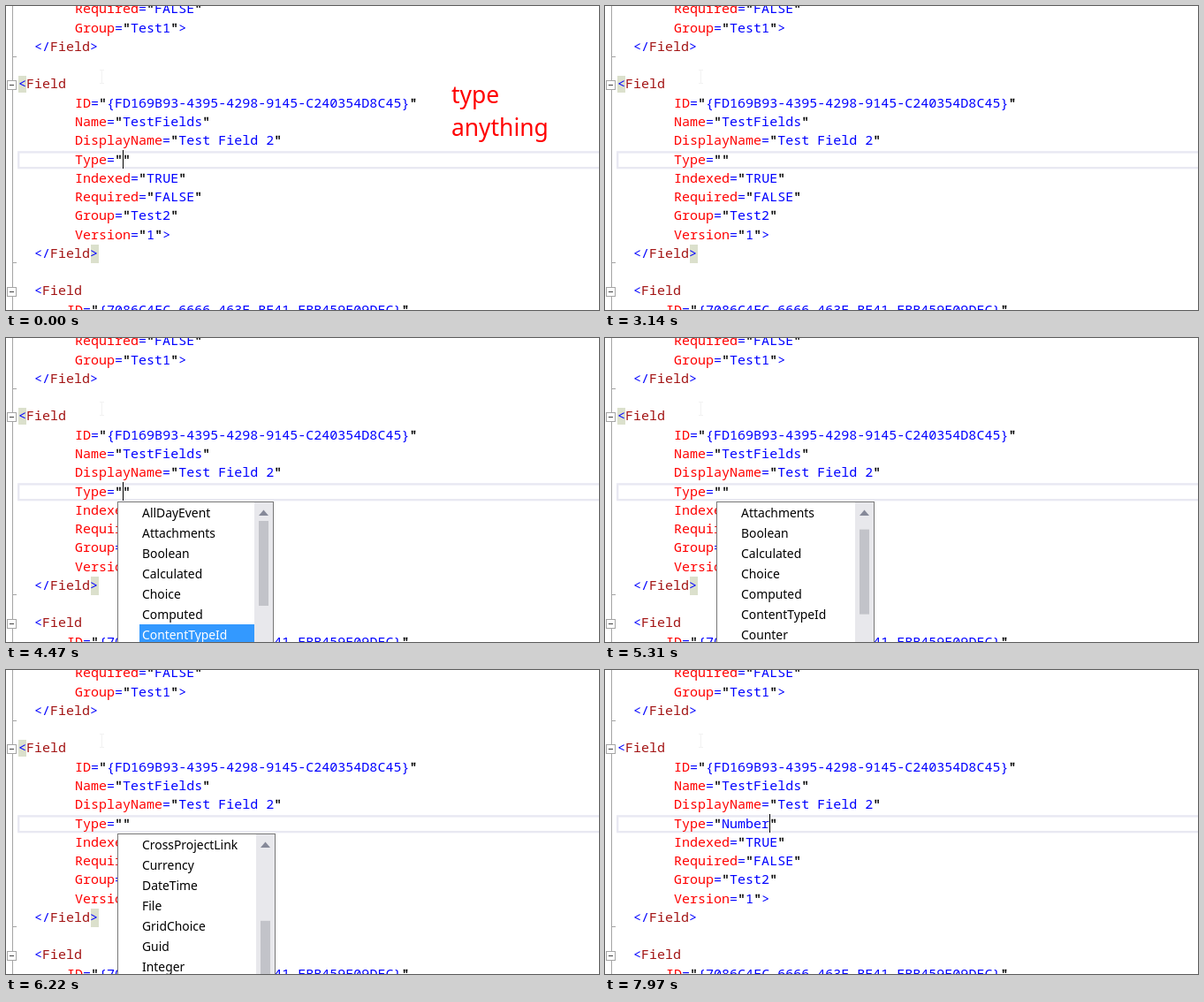
An HTML page that plays this animation: 671 px wide and 344 px high, repeating every 8000 ms.

```html
<!DOCTYPE html>
<html lang="en">
<head>
<meta charset="utf-8">
<title>Attribute completion</title>
<style>
  @property --n { syntax: "<number>"; inherits: true; initial-value: 0; }

  html, body { margin: 0; width: 100%; height: 100%; overflow: hidden; background: #fff; }
  svg { display: block; width: 671px; height: 344px; }
  text { white-space: pre; }

  .code { font: 15.03px "Noto Sans Mono", "DejaVu Sans Mono", monospace; }
  .tag { fill: #a31515; }
  .attr { fill: #f00; }
  .val { fill: #00f; }
  .quote { stroke: #000; stroke-width: .4px; }
  .note { font: 26.4px "Noto Sans", "Open Sans", sans-serif; fill: #f00; }
  .popup text { font: 13.9px "Noto Sans", "Open Sans", sans-serif; }
  .outline { fill: none; stroke: #a5a5a5; }
  .brace { fill: #dbe0cc; }

  .note, .before, .after, .caret, .popup, .pick { animation: 8s step-end infinite; }
  .note { animation-name: note; }
  .before { animation-name: before; }
  .after { animation-name: after; }
  .caret { animation-name: caret; }
  .popup { animation-name: popup, scroll; }
  .pick4 { animation-name: pick4; }
  .pick5 { animation-name: pick5; }
  .pick6 { animation-name: pick6; }

  .list { transform: translateY(calc(var(--n) * -23px)); }
  .thumb { transform: translateY(calc(min(var(--n), 12) * 9.6px)); }
  .bar { transform: translateX(calc(min(var(--n), 1) * 2px)); }
  .frame { width: calc(176px + min(var(--n), 1) * 2px); }

  @keyframes note { 0% { opacity: 1 } 6.25%, 100% { opacity: 0 } }
  @keyframes before { 0% { opacity: 1 } 99.625%, 100% { opacity: 0 } }
  @keyframes after { 0% { opacity: 0 } 99.625%, 100% { opacity: 1 } }
  @keyframes popup { 0% { opacity: 0 } 40.125% { opacity: 1 } 99.625%, 100% { opacity: 0 } }
  @keyframes pick4 { 0% { opacity: 0 } 40.125% { opacity: 1 } 48%, 100% { opacity: 0 } }
  @keyframes pick5 { 0% { opacity: 0 } 48% { opacity: 1 } 49.75%, 100% { opacity: 0 } }
  @keyframes pick6 { 0% { opacity: 0 } 49.75% { opacity: 1 } 59.375%, 100% { opacity: 0 } }
  @keyframes caret {
    0%, 43.625%, 55.875%, 67.25%, 79.5%, 90.875% { opacity: 1; transform: none }
    7.125%, 49.75%, 61.125%, 73.375%, 85.625%, 97% { opacity: 0; transform: none }
    99.625%, 100% { opacity: 1; transform: translateX(54px) }
  }
  @keyframes scroll {
    0% { --n: 0 }
    66.375% { --n: 1 }
    67.25% { --n: 2 }
    69% { --n: 3 }
    70.75% { --n: 4 }
    72.5% { --n: 5 }
    74.25% { --n: 6 }
    76% { --n: 7 }
    77.75% { --n: 8 }
    79.5% { --n: 9 }
    81.25% { --n: 10 }
    83% { --n: 11 }
    88.25% { --n: 12 }
    90.875%, 100% { --n: 13 }
  }
</style>
</head>
<body>
<svg viewBox="0 0 671 344">
  <clipPath id="view"><rect x="127" y="186" width="154" height="158"/></clipPath>

  <rect x="14.2" y="165.4" width="670" height="17.8" fill="none" stroke="#e8e8f2" stroke-width="2.3"/>
  <path d="M106 72.5H111M108.5 72.5V87.5M106 87.5H111" fill="none" stroke="#f2f2f2"/>

  <g class="outline">
    <path d="M7.5 0V344M8 57.5H12M8 290.5H12"/>
    <g fill="#fff">
      <rect x="1.5" y="84.5" width="10" height="10"/>
      <rect x="1.5" y="318.5" width="10" height="10"/>
    </g>
    <path d="M4 89.5H9M4 323.5H9" stroke="#444"/>
  </g>

  <g class="brace before">
    <rect x="14" y="79" width="9" height="19"/>
    <rect x="96" y="270" width="9" height="21"/>
  </g>

  <g class="code" id="code"></g>

  <g class="note">
    <text x="504" y="110">type</text>
    <text x="504" y="147">anything</text>
  </g>

  <rect class="caret" x="132" y="163" width="1" height="21"/>

  <g class="popup">
    <rect class="frame" x="126.5" y="185.5" width="176" height="209" fill="#fff" stroke="#777"/>
    <g clip-path="url(#view)"><g class="list" id="list"></g></g>
    <g class="bar">
      <rect x="281" y="186" width="21" height="158" fill="#e8e8ec"/>
      <path d="M286 201L291.5 194.5L297 201Z" fill="#868999"/>
      <rect class="thumb" x="286" y="207" width="11" height="96" fill="#c2c3c9"/>
    </g>
  </g>
</svg>
<script>
  const code = document.getElementById("code");
  const list = document.getElementById("list");
  const span = (cls, s) => `<tspan class="${cls}">${s}</tspan>`;
  const quote = span("quote", '"');

  function line(row, x, html, cls = "") {
    const y = Math.round(29.62 + 21.27 * row);
    code.insertAdjacentHTML("beforeend", `<text class="${cls}" x="${x}" y="${y}">${html}</text>`);
  }
  function attr(row, name, value, { x = 78, end = "", cls } = {}) {
    line(row, x, span("attr", name) + span("val", "=") + quote +
      span("val", value) + quote + span("val", end), cls);
  }
  const open = (row, x) => line(row, x, span("val", "&lt;") + span("tag", "Field"));
  const close = row => line(row, 32, span("val", "&lt;/") + span("tag", "Field") + span("val", "&gt;"));

  attr(-1, "Required", "FALSE");
  attr(0, "Group", "Test1", { end: "&gt;" });
  close(1);

  open(3, 14);
  attr(4, "ID", "{FD169B93-4395-4298-9145-C240354D8C45}");
  attr(5, "Name", "TestFields");
  attr(6, "DisplayName", "Test Field 2");
  attr(7, "Type", "", { cls: "before" });
  attr(7, "Type", "Number", { cls: "after" });
  attr(8, "Indexed", "TRUE");
  attr(9, "Required", "FALSE");
  attr(10, "Group", "Test2");
  attr(11, "Version", "1", { end: "&gt;" });
  close(12);

  open(14, 32);
  attr(15, "ID", "{7086C4FC-6666-463F-BF41-FBB459F09DFC}", { x: 69 });

  const types = ("AllDayEvent Attachments Boolean Calculated Choice Computed ContentTypeId " +
    "Counter CrossProjectLink Currency DateTime File GridChoice Guid Integer Lookup " +
    "LookupMulti ModStat MultiChoice Note Number").split(" ");
  const item = (i, fill) => `<text x="154" y="${203 + 23 * i}" fill="${fill}">${types[i]}</text>`;

  list.innerHTML = types.map((_, i) => item(i, "#000")).join("") +
    [4, 5, 6].map(i => `<g class="pick pick${i}">
      <rect x="151" y="${186 + 23 * i}" width="130" height="23" fill="#39f"/>${item(i, "#fff")}</g>`).join("");
</script>
</body>
</html>
```
